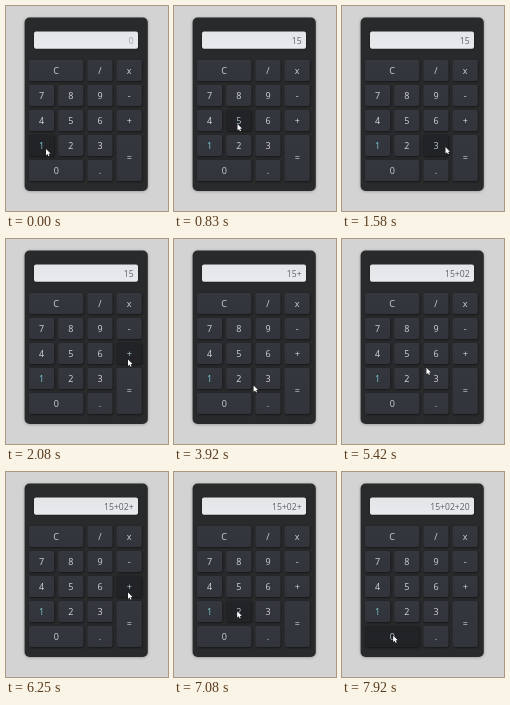
An HTML page with a canvas that plays this animation: 162x205 px, repeating every 8000 ms.

```html
<!DOCTYPE html>
<html lang="en">
<head>
<meta charset="utf-8">
<title>Calculator</title>
<style>
  html, body { margin: 0; width: 100%; height: 100%; overflow: hidden; background: #d3d3d3; }
  canvas { display: block; width: 100vw; height: 100vh; }
</style>
</head>
<body>
<canvas id="stage"></canvas>
<script>
const W = 162, H = 205, LOOP = 8000;
const FONT = '"Open Sans", "Noto Sans", sans-serif';
const canvas = document.getElementById('stage');
const ctx = canvas.getContext('2d');

const COLS = [23, 52.2, 81.4, 110.6];
const ROWS = [54, 79, 104, 129, 154];
const KEY_W = 25.2, KEY_H = 21;

function key(label, col, row, cols = 1, rows = 1) {
  return {
    label, x: COLS[col], y: ROWS[row],
    w: KEY_W + (cols - 1) * 29.2,
    h: KEY_H + (rows - 1) * 25
  };
}

const keys = [
  key('C', 0, 0, 2), key('/', 2, 0), key('x', 3, 0),
  key('7', 0, 1), key('8', 1, 1), key('9', 2, 1), key('-', 3, 1),
  key('4', 0, 2), key('5', 1, 2), key('6', 2, 2), key('+', 3, 2),
  key('1', 0, 3), key('2', 1, 3), key('3', 2, 3), key('=', 3, 3, 1, 2),
  key('0', 0, 4, 2), key('.', 2, 4)
];

// Pointer resting places
const ONE = [40, 142.5], FIVE = [63.5, 117.5], PLUS = [122, 120],
      ZERO = [51.2, 163.2], TWO = [63.2, 138.8];

// start, end, from, to, optional bend point
const moves = [
  [180, 680, ONE, FIVE],
  [1220, 2060, FIVE, PLUS, [128, 165]],
  [3700, 4090, PLUS, ZERO],
  [4560, 4920, ZERO, TWO],
  [5120, 5860, TWO, PLUS, [92.5, 121.5]],
  [6330, 6900, PLUS, TWO],
  [7260, 7640, TWO, ZERO]
];

const clicks = [
  [120, '1'], [750, '5'], [3330, '+'], [4400, '0'],
  [5040, '2'], [6250, '+'], [7160, '2'], [7800, '0']
];

function pointerAt(t) {
  let pos = ONE;
  for (const [start, end, a, b, bend] of moves) {
    if (t < start) break;
    const u = Math.min(1, (t - start) / (end - start));
    const s = u * u * (3 - 2 * u);
    pos = a.map((p, i) => {
      const c = bend ? bend[i] : (p + b[i]) / 2;
      return (1 - s) * (1 - s) * p + 2 * s * (1 - s) * c + s * s * b[i];
    });
  }
  return pos;
}

function vertical(y, h, top, bottom) {
  const g = ctx.createLinearGradient(0, y, 0, y + h);
  g.addColorStop(0, top);
  g.addColorStop(1, bottom);
  return g;
}

function box(x, y, w, h, r) {
  ctx.beginPath();
  ctx.roundRect(x, y, w, h, r);
}

function shadow(color, blur, dx, dy) {
  const k = canvas.width / W;
  ctx.shadowColor = color;
  ctx.shadowBlur = blur * k;
  ctx.shadowOffsetX = dx * k;
  ctx.shadowOffsetY = dy * k;
}

function text(str, x, y, size, color, align) {
  ctx.font = `${size}px ${FONT}`;
  ctx.textAlign = align;
  ctx.fillStyle = color;
  ctx.fillText(str, x, y);
}

function drawCase() {
  ctx.fillStyle = '#d3d3d3';
  ctx.fillRect(0, 0, W, H);
  ctx.save();
  shadow('rgba(0,0,0,.3)', 3, 0, 0.4);
  box(18.6, 11.6, 123.2, 173.4, 5);
  ctx.fillStyle = '#292a2b';
  ctx.fill();
  ctx.restore();
}

function drawDisplay(t) {
  const typed = clicks.filter(c => t >= c[0]).map(c => c[1]).join('');
  ctx.save();
  shadow('rgba(0,0,0,.5)', 2, 0, 0.3);
  box(28, 25.5, 104, 17.2, 2);
  ctx.fillStyle = vertical(25.5, 17.2, '#e3e5e9', '#e8eaed');
  ctx.fill();
  ctx.restore();
  text(typed || '0', 127.6, 37.6, 8.6, typed ? '#5c5f63' : '#a0a2a6', 'right');
}

function drawKey(k, over) {
  ctx.save();
  shadow('rgba(0,0,0,.6)', 2.2, 0.5, 0.8);
  box(k.x, k.y, k.w, k.h, 2);
  ctx.fillStyle = over ? '#212327' : vertical(k.y, k.h, '#34373e', '#31343b');
  ctx.fill();
  ctx.restore();
  const color = k.label === '1' ? '#7fcbd9' : over ? '#b4c8ce' : '#d3d5d8';
  text(k.label, k.x + k.w / 2, k.y + k.h / 2 + 3.3, 9, color, 'center');
}

function drawPointer([x, y]) {
  ctx.save();
  ctx.translate(x, y + 0.5);
  ctx.scale(0.8, 0.8);
  ctx.beginPath();
  ctx.moveTo(0, 0);
  ctx.lineTo(0, 8);
  ctx.lineTo(1.9, 6.3);
  ctx.lineTo(3.1, 9);
  ctx.lineTo(4.4, 8.4);
  ctx.lineTo(3.2, 5.8);
  ctx.lineTo(5.7, 5.7);
  ctx.closePath();
  ctx.lineJoin = 'round';
  ctx.lineWidth = 0.9;
  ctx.strokeStyle = '#111';
  ctx.stroke();
  ctx.fillStyle = '#fff';
  ctx.fill();
  ctx.restore();
}

function resize() {
  const dpr = window.devicePixelRatio || 1;
  const w = Math.round(innerWidth * dpr), h = Math.round(innerHeight * dpr);
  if (canvas.width !== w || canvas.height !== h) {
    canvas.width = w;
    canvas.height = h;
  }
  ctx.setTransform(w / W, 0, 0, h / H, 0, 0);
}

function frame() {
  const t = performance.now() % LOOP;
  const tip = pointerAt(t);
  resize();
  drawCase();
  drawDisplay(t);
  for (const k of keys) {
    const over = tip[0] >= k.x && tip[0] <= k.x + k.w &&
                 tip[1] >= k.y && tip[1] <= k.y + k.h;
    drawKey(k, over);
  }
  drawPointer(tip);
  requestAnimationFrame(frame);
}

frame();
</script>
</body>
</html>
```
